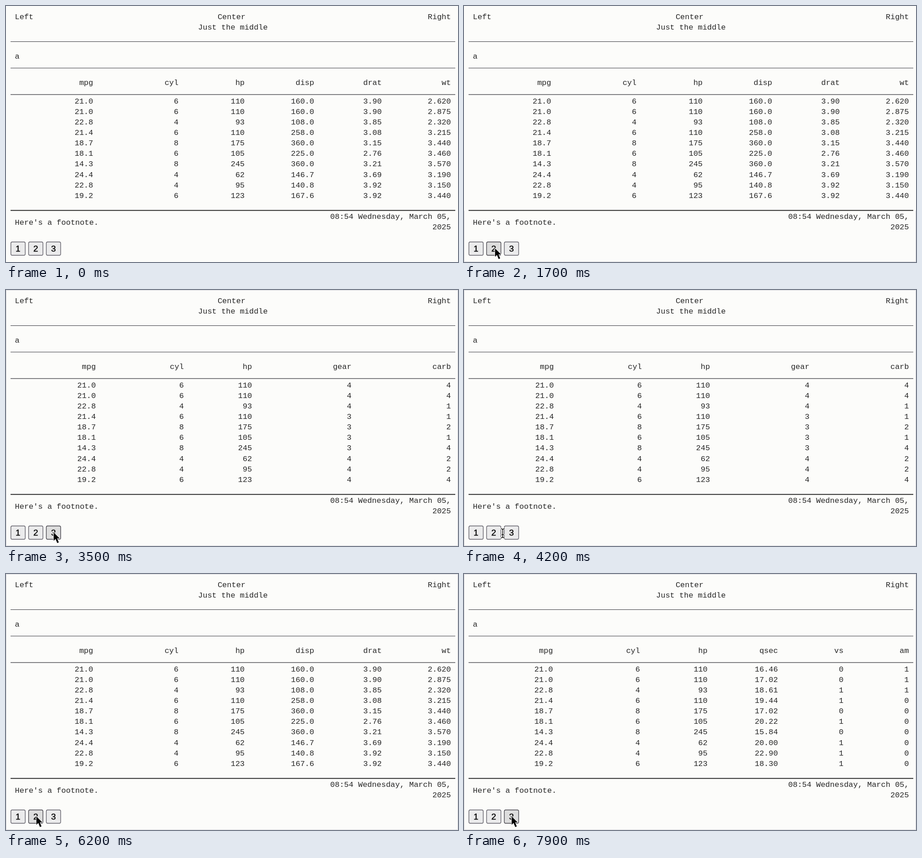
An HTML page that plays this animation: 993x564 px, repeating every 8 s.

```html
<!DOCTYPE html>
<html lang="en">
<head>
<meta charset="utf-8">
<title>Paged table</title>
<style>
  html, body { margin: 0; width: 100%; height: 100%; overflow: hidden; background: #fcfcfa; }
  svg { display: block; width: 993px; height: 564px; }
  text { font: 17px "Courier New", "Liberation Mono", monospace; fill: #262626; }
  .end { text-anchor: end; }
  .mid { text-anchor: middle; }
  .rule { stroke: #33333a; stroke-width: 1.1; }
  .rule.last { stroke: #111; stroke-width: 1.7; }
  .edge { fill: none; stroke: #d6d6da; }
  .button rect { fill: #ebebec; stroke: #62606a; stroke-width: 1.4; }
  .button.hover rect { fill: #ddd; stroke: #45434b; }
  .button text { font: 19px Arial, "Liberation Sans", sans-serif; fill: #000; stroke: #000; stroke-width: .35; }
</style>
</head>
<body>
<svg id="stage" viewBox="0 0 993 564"></svg>
<script>
const LOOP = 8000, STEP = 100;
const LEFT = 10, WIDTH = 977, PAD = 9.5, RIGHT = LEFT + WIDTH - PAD, LINE = 23.1;
// The pointer visits one button per period, moving first and clicking later
const ENTER = 800, PERIOD = 1600, MOVE = 640, CLICK = 1100;

const stage = document.getElementById('stage');

function add(parent, tag, attrs = {}, content = '') {
  const node = document.createElementNS('http://www.w3.org/2000/svg', tag);
  for (const key in attrs) node.setAttribute(key, attrs[key]);
  node.textContent = content;
  parent.append(node);
  return node;
}
const label = (parent, x, y, content, cls = '') => add(parent, 'text', { x, y, class: cls }, content);
const show = (node, on) => node.setAttribute('visibility', on ? 'visible' : 'hidden');

const cars = `mpg hp disp drat wt qsec carb
21.0 110 160.0 3.90 2.620 16.46 4
21.0 110 160.0 3.90 2.875 17.02 4
22.8 93 108.0 3.85 2.320 18.61 1
21.4 110 258.0 3.08 3.215 19.44 1
18.7 175 360.0 3.15 3.440 17.02 2
18.1 105 225.0 2.76 3.460 20.22 1
14.3 245 360.0 3.21 3.570 15.84 4
24.4 62 146.7 3.69 3.190 20.00 2
22.8 95 140.8 3.92 3.150 22.90 2
19.2 123 167.6 3.92 3.440 18.30 4`;

const [names, ...rows] = cars.split('\n').map(line => line.split(' '));
const records = rows.map((cells, i) => {
  const car = Object.fromEntries(names.map((name, k) => [name, cells[k]]));
  car.cyl = car.disp < 150 ? 4 : car.disp < 300 ? 6 : 8;
  car.vs = car.qsec > 18 ? 1 : 0;
  car.am = i < 3 ? 1 : 0;
  car.gear = i < 3 || i > 6 ? 4 : 3;
  return car;
});

// Each page shares the full width among its columns by weight
const weights = {
  mpg: 191, cyl: 187.5, hp: 145.3, disp: 152.7, drat: 148.5, wt: 152,
  qsec: 151.6, vs: 141, am: 141, gear: 212, carb: 212
};
const pages = ['disp drat wt', 'qsec vs am', 'gear carb'].map(rest => {
  const group = add(stage, 'g');
  const shown = `mpg cyl hp ${rest}`.split(' ');
  const total = shown.reduce((sum, name) => sum + weights[name], 0);
  let edge = LEFT;
  for (const name of shown) {
    edge += weights[name] / total * WIDTH;
    label(group, edge - PAD, 174, name, 'end');
    records.forEach((car, i) => label(group, edge - PAD, 214.85 + i * LINE, car[name], 'end'));
  }
  return group;
});

label(stage, 19.5, 29, 'Left');
label(stage, 495.5, 29, 'Center', 'mid');
label(stage, 498.5, 52, 'Just the middle', 'mid');
label(stage, RIGHT, 29, 'Right', 'end');
label(stage, 19.5, 116, 'a');
label(stage, 19.5, 482, "Here's a footnote.");
label(stage, RIGHT, 469, '08:54 Wednesday, March 05,', 'end');
label(stage, RIGHT, 469 + LINE, '2025', 'end');

const rule = (y, cls) => add(stage, 'line', { x1: LEFT, x2: LEFT + WIDTH, y1: y, y2: y, class: cls });
for (let i = 0; i < 3; i++) rule(78.5 + i * 58.3, 'rule');
rule(450.3, 'rule last');

const lowerEdge = add(stage, 'path', { d: 'M.5 451V563.5H992.5V451', class: 'edge' });
const upperEdge = add(stage, 'path', { d: 'M.5 451V.5H992.5V451', class: 'edge' });

const buttons = [0, 1, 2].map(i => {
  const x = LEFT + i * 38.9;
  const node = add(stage, 'g', { class: 'button' });
  add(node, 'rect', { x: x + .7, y: 519.7, width: 31.6, height: 29.6, rx: 3.2 });
  label(node, x + 16.4, 541, i + 1, 'mid');
  return { x, node };
});

const cursor = add(stage, 'g');
const arrow = add(cursor, 'path', {
  d: 'M.7 0V18.5L4.9 14.6L8.6 23.4L12 22L8.3 13.3H13.9Z',
  fill: '#000', stroke: '#fff', 'stroke-width': 1.8, 'stroke-linejoin': 'round', 'paint-order': 'stroke'
});
const beam = add(cursor, 'g', { fill: 'none', 'stroke-linecap': 'round' });
for (const [stroke, width] of [['#fff', 3.6], ['#000', 1.5]])
  add(beam, 'path', {
    d: 'M-3.5 -8Q0 -8 0 -5V9Q0 12 -3.5 12M3.5 -8Q0 -8 0 -5V9Q0 12 3.5 12M-2 5H2',
    stroke, 'stroke-width': width
  });

const ease = u => u - Math.sin(2 * Math.PI * u) / 17;
const target = visit => (visit + 1) % 3;
const spot = visit => visit < 0 ? [985, 556] : [31 + 36.5 * target(visit), 534];

function pointerAt(t) {
  const visit = Math.floor((t - ENTER) / PERIOD);
  const k = ease(Math.min(1, (t - ENTER - visit * PERIOD) / MOVE));
  const [x0, y0] = spot(visit - 1), [x1, y1] = spot(visit);
  return [x0 + (x1 - x0) * k, y0 + (y1 - y0) * k];
}

function draw(t) {
  const lastClick = Math.max(-1, Math.floor((t - ENTER - CLICK) / PERIOD));
  pages.forEach((group, i) => show(group, i === target(lastClick)));

  const present = t >= ENTER;
  const [x, y] = pointerAt(t);
  let hovering = false;
  for (const b of buttons) {
    const over = present && x >= b.x && x < b.x + 35.6 && y < 549;
    b.node.classList.toggle('hover', over);
    hovering ||= over;
  }
  const inGap = !hovering && x > buttons[0].x && x < buttons[2].x;
  cursor.setAttribute('transform', `translate(${x.toFixed(2)} ${y.toFixed(2)})`);
  show(arrow, present && !inGap);
  show(beam, present && inGap);
  show(lowerEdge, t >= 1000);
  show(upperEdge, lastClick >= 0);
}

const start = performance.now();
function tick() {
  const t = (performance.now() - start) % LOOP;
  draw(Math.floor(t / STEP) * STEP);
  requestAnimationFrame(tick);
}
tick();
</script>
</body>
</html>
```
